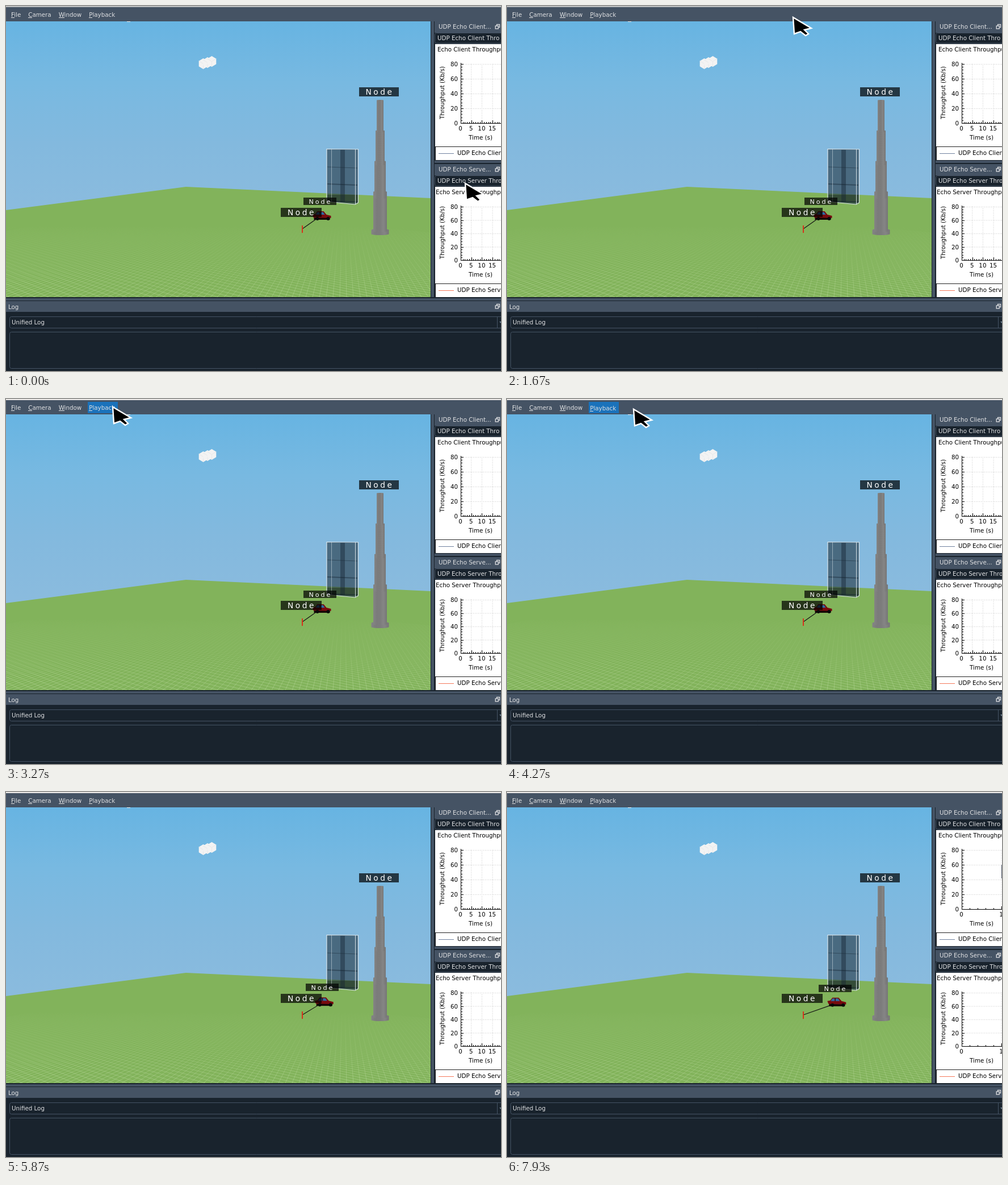
Recreate the animation shown at these times as an HTML page with a canvas. Size 872 by 642 pixels, loop 8000 ms.

```html
<!DOCTYPE html>
<html lang="en">
<head>
<meta charset="utf-8">
<title>Network simulation viewer</title>
<style>
html, body { margin: 0; width: 100%; height: 100%; overflow: hidden; background: #19232d; }
canvas { display: block; }
</style>
</head>
<body>
<canvas id="stage" width="872" height="642"></canvas>
<script>
const ctx = document.getElementById('stage').getContext('2d');
const LOOP = 8000, SLATE = '#455364', DARK = '#19232d', LIGHT = '#e0e1e3';

// Pointer stops as [ms, x, y]
const stops = [[70, 808, 311], [670, 755, 37], [1000, 752, 36], [1670, 503, 19], [2070, 492, 20],
  [2870, 187, 13], [3540, 187, 13], [3600, 228, 11], [4530, 220, 20]];

function rect(x, y, w, h, color) {
  ctx.fillStyle = color;
  ctx.fillRect(x, y, w, h);
}

function text(str, x, y, color = LIGHT, align = 'left') {
  ctx.font = '10.3px "DejaVu Sans", sans-serif';
  ctx.textAlign = align;
  ctx.fillStyle = color;
  ctx.fillText(str, x, y);
}

function trace(points) {
  ctx.beginPath();
  points.forEach(([x, y]) => ctx.lineTo(x, y));
}

function line(color, width, ...points) {
  trace(points);
  ctx.strokeStyle = color;
  ctx.lineWidth = width;
  ctx.stroke();
}

function poly(color, ...points) {
  trace(points);
  ctx.closePath();
  ctx.fillStyle = color;
  ctx.fill();
}

const hLine = (color, x0, x1, y) => rect(x0, y, x1 - x0, 1, color);
const vLine = (color, x, y0, y1) => rect(x, y0, 1, y1 - y0, color);

function frame(x, y, w, h) {
  ctx.beginPath();
  ctx.roundRect(x + .5, y + .5, w, h, 3);
  ctx.strokeStyle = SLATE;
  ctx.lineWidth = 1;
  ctx.stroke();
}

function gradient(x0, y0, x1, y1, ...colors) {
  const g = ctx.createLinearGradient(x0, y0, x1, y1);
  colors.forEach((c, i) => g.addColorStop(i / (colors.length - 1), c));
  return g;
}

function along(path, t) {
  const next = path.findIndex(p => p[0] > t);
  if (next < 0) return path.at(-1).slice(1);
  const [t1, x1, y1] = path[next], [t0, x0, y0] = path[Math.max(0, next - 1)];
  const k = t1 > t0 ? (t - t0) / (t1 - t0) : 0;
  return [Math.round(x0 + (x1 - x0) * k), Math.round(y0 + (y1 - y0) * k)];
}

function cloud() {
  for (let n = 0; n < 3; n++) {
    const x = 347.5 + 7.5 * n, y = 101.5 - 2 * n;
    const corner = i => [x + 9 * Math.sin(i * Math.PI / 3), y + 9.5 * Math.cos(i * Math.PI / 3)];
    poly('#f3f3f3', ...[0, 1, 2, 3, 4, 5].map(corner));
    for (const i of [0, 2, 4]) line('#e6e8ea', 1, [x, y], corner(i));
  }
  rect(213, 27, 6, 1, '#eef2f4');
}

function ground() {
  ctx.save();
  poly('#82b35b', [0, 359], [317, 318], [748, 338], [748, 512], [0, 512]);
  ctx.clip();
  const fade = gradient(0, 385, 0, 512, 'rgba(190,220,160,0)', 'rgba(190,220,160,.2)', 'rgba(195,224,168,.5)');
  for (let x = -600; x < 950; x += 12) line(fade, .8, [595, 282], [x, 512]);
  for (let x = -40; x < 1920; x += 23) line(fade, .8, [-459, 282], [x, 512]);
  ctx.restore();
}

function glassBuilding() {
  const edge = 'rgba(235,242,246,.85)';
  const outline = [[565, 344], [565, 251.5], [620.5, 252], [620.5, 346], [615, 349], [565, 344]];
  poly('rgba(38,58,72,.62)', ...outline);
  rect(566, 332, 54, 13, 'rgba(15,25,15,.35)');
  rect(589, 253, 8, 92, 'rgba(20,36,50,.45)');
  for (let i = 0; i < 3; i++) line('rgba(20,36,50,.45)', 1 + i, [566, 283 + 30 * i], [619, 285 + 30 * i]);
  line(edge, 1.2, ...outline);
  vLine('rgba(225,235,240,.5)', 573, 252, 345);
  vLine(edge, 615, 252, 349);
}

function cylinder(half, top, bottom) {
  const x = 659, ry = half / 8;
  ctx.fillStyle = gradient(x - half, 0, x + half, 0, '#848484', '#7b7b7b', '#7c7c7c', '#858585', '#767676');
  ctx.beginPath();
  ctx.ellipse(x, top + ry, half, ry, 0, Math.PI, 0);
  ctx.ellipse(x, bottom - ry, half, ry, 0, 0, Math.PI);
  ctx.fill();
}

function tower() {
  cylinder(15.5, 392, 403);
  for (let i = 3; i >= 0; i--) cylinder(6 + 2 * i, 165 + 53.4 * i, 222 + 58.6 * i);
}

function nodeLabel(x, y, w, h) {
  const size = h * .86;
  rect(x, y, w, h, 'rgba(0,0,0,.7)');
  ctx.font = `${size}px "DejaVu Sans", sans-serif`;
  ctx.letterSpacing = w * .05 + 'px';
  ctx.textAlign = 'left';
  ctx.fillStyle = '#fff';
  ctx.fillText('Node', x + w * .165, y + h / 2 + size * .37);
  ctx.letterSpacing = '0px';
}

function car(x, y) {
  ctx.save();
  ctx.translate(x, y);
  rect(3, 9, 28, 6, '#150606');
  poly('#780a0e', [0, 6], [5, 5], [9, 0], [20, 0], [25, 6], [33, 8], [33, 12], [2, 11]);
  poly('#2f6ba4', [6, 6], [9, 1.5], [19, 1.5], [22, 6]);
  rect(13, 1, 1.5, 5, '#300');
  ctx.fillStyle = '#080808';
  for (const wheel of [9, 28]) {
    ctx.beginPath();
    ctx.arc(wheel, 13, 3, 0, 7);
    ctx.fill();
  }
  ctx.restore();
}

function scene(t) {
  ctx.save();
  ctx.beginPath();
  ctx.rect(0, 27, 748, 485);
  ctx.clip();
  rect(0, 27, 748, 485, gradient(0, 27, 0, 350, '#67b4e2', '#78b9e1', '#83b9de', '#8abbde'));
  cloud();
  ground();
  glassBuilding();
  tower();
  const drive = Math.max(0, t - 5450) / 100, drop = drive * .07;
  line('#111', 1.1, [522, 392], [549 + drive, 373 + drop / 2]);
  rect(521, 386, 2, 13, '#d8321c');
  car(539.5 + drive, 361 + drop / 2);
  nodeLabel(622, 143, 70, 16);
  nodeLabel(Math.round(524 + drive), Math.round(337 + drop), 58, 13);
  nodeLabel(484, 355, 72, 16);
  ctx.restore();
}

function floatIcon(x, y) {
  ctx.strokeStyle = LIGHT;
  ctx.lineWidth = 1.3;
  ctx.strokeRect(x + 2.5, y - 3.5, 5, 5);
  rect(x, y - 1, 6, 5, SLATE);
  ctx.strokeRect(x + .2, y - 1, 5, 5);
}

function dock(kind, top, bottom) {
  rect(755, top, 117, 20, SLATE);
  text(`UDP Echo ${kind.slice(0, 6)}`.slice(0, kind === 'Client' ? 15 : 14) + '...', 762, top + 13);
  floatIcon(862, top + 9);
  frame(755, top + 20, 130, 18);
  text(`UDP Echo ${kind} Thro`, 760, top + 33);
  rect(756, top + 40, 116, bottom - top - 40, '#fff');
  text(`Echo ${kind} Throughput`, kind === 'Client' ? 760 : 757, top + 53, '#000');
}

function plot(kind, zero, step, bottom, color, zoomed) {
  const gap = zoomed ? 70 : 18.7, labelStep = zoomed ? 1 : 5, height = 4 * step;
  ctx.setLineDash([1, 2]);
  for (let i = 1; i < 5; i++) line('#c4c4c4', 1, [802, zero - i * step + .5], [872, zero - i * step + .5]);
  for (let x = 801 + gap; x < 872; x += gap) line('#c4c4c4', 1, [x, zero - height], [x, zero]);
  ctx.setLineDash([]);

  vLine('#000', 801, zero - height - 2, zero);
  hLine('#000', 801, 872, zero);
  for (let i = 0; i <= 20; i++) hLine('#000', 801, i % 5 ? 804 : 806, Math.round(zero - i * step / 5));
  for (let i = 0; i * gap < 355; i++) {
    vLine('#000', Math.round(801 + i * gap / 5), zero - (i % 5 ? 2 : 5), zero);
  }
  for (let i = 0; i < 5; i++) text(i * 20, 796, zero - i * step + 4, '#000', 'right');
  for (let i = 0; i * gap < 71; i++) text(i * labelStep, 800.5 + i * gap, zero + 13, '#000', 'center');
  text('Time (s)', 836, zero + 28.5, '#000', 'center');

  ctx.save();
  ctx.translate(771.5, zero - height / 2 - 1.5);
  ctx.rotate(-Math.PI / 2);
  text('Throughput (Kb/s)', 0, 0, '#000', 'center');
  ctx.restore();

  vLine('#222', 756, bottom - 24, bottom);
  hLine('#222', 756, 872, bottom - 24);
  hLine(color, 762, 789, bottom - 12);
  text(`UDP Echo ${kind}`, 795, bottom - 9, '#000');
}

function menuBar(t) {
  rect(0, 0, 872, 2, t < 3270 ? '#bfc1c2' : '#eceae8');
  rect(0, 2, 872, 25, SLATE);
  const open = t >= 2930 && t < 5330;
  if (open) rect(144, 5, 53, 20, '#1a72bb');
  let x = 9;
  for (const item of ['File', 'Camera', 'Window', 'Playback']) {
    const y = item === 'Playback' && open && t >= 3600 ? 20 : 19;
    text(item, x, y);
    hLine(LIGHT, Math.round(x), Math.round(x + ctx.measureText(item[0]).width), y + 1);
    x += ctx.measureText(item).width + 13;
  }
}

function panels(t) {
  rect(0, 0, 872, 642, DARK);
  menuBar(t);
  rect(749, 27, 5, 485, SLATE);
  const zoomed = t >= 7070;
  dock('Client', 27, 271);
  plot('Client', 206, 26, 271, '#7183a0', zoomed);
  if (t >= 7600) vLine('#4d5566', 871, 128, 152);
  rect(755, 272, 117, 4, SLATE);
  dock('Server', 278, 512);
  plot('Server', 447, 23.5, 512, '#f4795b', zoomed);

  rect(0, 514, 872, 4, SLATE);
  rect(0, 519, 872, 19, SLATE);
  text('Log', 4, 533);
  floatIcon(862, 528);
  frame(6, 546, 880, 20);
  text('Unified Log', 10, 560);
  vLine(SLATE, 865, 546, 567);
  poly('#788d9c', [869, 555], [875, 555], [872, 558]);
  frame(6, 573, 880, 64);
}

function pointer(t) {
  ctx.save();
  if (t < 5330) {
    ctx.translate(...along(stops, t));
    const arrow = [[1, 1], [33, 20], [21, 23], [28, 30], [23, 33], [14, 26], [3, 30]];
    poly('#000', ...arrow);
    line('#fff', 2.4, ...arrow, arrow[0], arrow[1]);
  } else if (t >= 6670 && t < 7600) {
    ctx.translate(...along([[6670, 655, 4], [6800, 702, 12], [7600, 875, 8]], t));
    const arrow = [[1, 1], [1, 20], [5.5, 16.5], [9, 24], [12.5, 22.5], [9.5, 15.5], [15, 15]];
    ctx.shadowColor = 'rgba(0,0,0,.45)';
    ctx.shadowBlur = 4;
    ctx.shadowOffsetX = ctx.shadowOffsetY = 2;
    poly('#666a6c', ...arrow);
    ctx.shadowColor = 'transparent';
    line('#c9cbcc', 1.2, ...arrow, arrow[0]);
  }
  ctx.restore();
}

function draw() {
  const t = performance.now() % LOOP;
  panels(t);
  scene(t);
  pointer(t);
  requestAnimationFrame(draw);
}
draw();
</script>
</body>
</html>
```
